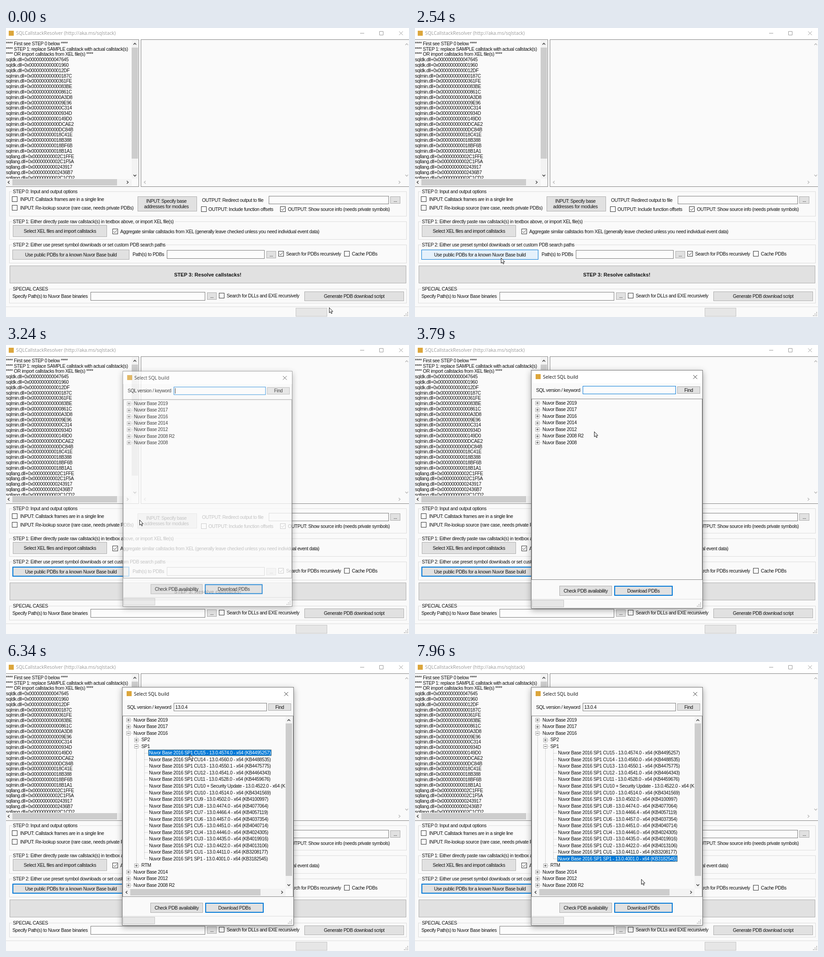
Animation, 882 px wide and 635 px high, one loop 8 s. Source, as an HTML page:

```html
<!DOCTYPE html>
<html lang="en">
<head>
<meta charset="utf-8">
<title>Callstack resolver</title>
<style>
html, body { margin: 0; width: 100%; height: 100%; overflow: hidden; background: #fafafa; }
svg { display: block; width: 100%; height: 100%; }
text { font: 10.4px "Liberation Sans", Arial, sans-serif; letter-spacing: -.36px; fill: #111; white-space: pre; }
text.title { font: 10.35px "Open Sans", sans-serif; letter-spacing: 0; }
text.bold { font-size: 11.1px; font-weight: bold; letter-spacing: 0; }
.mid { text-anchor: middle; }
.group { fill: none; stroke: #dcdcdc; }
.pane { fill: #fafafa; stroke: #828282; }
.field { fill: #fcfcfc; stroke: #7a7a7a; }
.button { fill: #e1e1e1; stroke: #adadad; }
.progress { fill: #e6e6e6; stroke: #c4c4c4; }
.check { fill: #fff; stroke: #333; }
.thumb { fill: #cdcdcd; }
.track { fill: #f3f3f3; }
.line { fill: none; stroke: #333; }
.dots { fill: none; stroke: #b0b0b0; stroke-dasharray: 1 1; }
.expander { fill: #fff; stroke: #a8a8a8; }
.hover { fill: #e5f1fb; stroke: #0078d7; }
.pressed { fill: #cce4f7; stroke: #005499; }
/* A two pixel border that lies inside the button edge. */
.default { fill: #e1e1e1; stroke: #0078d7; stroke-width: 3; clip-path: inset(-.5px) fill-box; }
.focus { stroke: #0078d7; }
.leaf rect { fill: none; }
.leaf.on rect { fill: #0078d7; stroke: #d98a30; stroke-dasharray: 1 1; }
.leaf.on text { fill: #fff; }
#titlebar text { fill: #999; }
#titlebar path { stroke: #999; }
#titlebar.active text { fill: #000; }
#titlebar.active path { stroke: #000; }
#window { filter: drop-shadow(0 4px 7px rgba(0, 0, 0, .33)); fill: #fafafa; stroke: #707070; }
</style>
</head>
<body>
<svg id="stage" viewBox="0 0 882 635" preserveAspectRatio="none"></svg>
<script>
const LOOP = 8000;
const PRODUCT = 'Nuvor Base';

// Drawing helpers; text takes the vertical middle of its line.
const box = (x1, y1, x2, y2, cls, id = '') =>
  `<rect id="${id}" class="${cls}" x="${x1 + .5}" y="${y1 + .5}" width="${x2 - x1 - 1}" height="${y2 - y1 - 1}"/>`;
const fill = (x1, y1, x2, y2, cls) =>
  `<rect class="${cls}" x="${x1}" y="${y1}" width="${x2 - x1}" height="${y2 - y1}"/>`;
const text = (x, y, s, cls = '', id = '') => `<text id="${id}" class="${cls}" x="${x}" y="${y + 3.7}">${s}</text>`;
const line = (d, cls = 'line') => `<path class="${cls}" d="${d}"/>`;
const button = (x1, y1, x2, y2, s, cls = 'button', id = '') =>
  box(x1, y1, x2, y2, cls, id) + text((x1 + x2) / 2, (y1 + y2) / 2, s, 'mid');
const group = (y1, y2, label, width) =>
  box(7, y1, 877, y2, 'group') + `<rect x="13" y="${y1 - 2}" width="${width}" height="5" fill="#fafafa"/>` + text(15, y1, label);
const check = (x, y, label, labelX, on) =>
  box(x, y, x + 12, y + 12, 'check') + (on ? line(`M${x + 2.5} ${y + 6}l2.5 2.7l4.8 -5.5`) : '') + text(labelX, y + 6, label);
const chevron = (x, y, turn, color = '#444') =>
  `<path d="M-3 1.6L0 -1.6L3 1.6" fill="none" stroke="${color}" stroke-width="1.5" transform="translate(${x} ${y}) rotate(${turn})"/>`;
const grip = (x, y) => [[0, 0], [-3.5, 0], [-7, 0], [0, -3.5], [-3.5, -3.5], [0, -7]]
  .map(([dx, dy]) => `<rect x="${x + dx}" y="${y + dy}" width="2" height="2" fill="#b5b5b5"/>`).join('');

const frames = [
  ['sqldk', '47645 1960 12DF'],
  ['sqlmin', '187C 361FE 83BE 861C A3D8 9E96 C314 934D 149D0 DCAE2 DC84B 18C41E 18B388 18BF6B 18B1A1'],
  ['sqllang', '2C1FFE 2C1F5A 243917 2436B7 2C1CD2'],
].flatMap(([dll, offsets]) => offsets.split(' ').map(o => `${dll}.dll+0x${o.padStart(16, '0')}`));

const callstack = [
  '**** First see STEP 0 below ****',
  '**** STEP 1: replace SAMPLE callstack with actual callstack(s)',
  '**** OR import callstacks from XEL file(s) ****',
  ...frames,
];

const mainWindow = () => `
  <rect width="882" height="635" fill="#fafafa"/>
  <rect width="882" height="25" fill="#fff"/>
  <g id="titlebar">
    <rect x="6" y="6" width="11" height="11" fill="#dca63c"/>
    ${text(22, 11.5, 'SQLCallstackResolver (http://aka.ms/sqlstack)', 'title')}
    ${line('M775 11.5h9M817.5 7.5h8v8h-8zM860.5 7.5l8 8m0 -8l-8 8')}
  </g>
  ${box(-2, 25, 291, 349, 'pane')}${box(295, 25, 885, 349, 'pane')}
  ${fill(275, 27, 289, 331, 'track')}${fill(0, 332, 275, 347, 'track')}
  ${fill(275, 43, 289, 287, 'thumb')}${fill(14, 332, 243, 346, 'thumb')}
  ${chevron(282, 35, 0)}${chevron(282, 324, 180)}${chevron(6, 339, -90)}${chevron(266, 339, 90)}
  ${chevron(877, 36, 0, '#bbb')}${chevron(877, 324, 180, '#bbb')}${chevron(304, 339, -90, '#bbb')}${chevron(861, 339, 90, '#bbb')}
  <clipPath id="paneClip"><rect y="26" width="275" height="305"/></clipPath>
  <g clip-path="url(#paneClip)">${callstack.map((s, i) => text(0, 34 + i * 11.8, s)).join('')}</g>

  ${group(359, 414, 'STEP 0: Input and output options', 148)}
  ${check(13, 370, 'INPUT: Callstack frames are in a single line', 31)}
  ${check(13, 389, 'INPUT: Re-lookup source (rare case, needs private PDBs)', 31)}
  ${box(288, 370, 418, 403, 'button')}
  ${text(351, 380.5, 'INPUT: Specify base', 'mid')}${text(351, 392.5, 'addresses for modules', 'mid')}
  ${text(429, 378, 'OUTPUT: Redirect output to file')}
  ${box(575, 369, 838, 387, 'field')}${button(841, 370, 863, 386, '...')}
  ${check(427, 392, 'OUTPUT: Include function offsets', 443)}
  ${check(600, 392, 'OUTPUT: Show source info (needs private symbols)', 617, true)}

  ${group(425, 465, 'STEP 1: Either directly paste raw callstack(s) in textbox above, or import XEL file(s)', 357)}
  ${button(15, 433, 221, 459, 'Select XEL files and import callstacks')}
  ${check(233, 441, 'Aggregate similar callstacks from XEL (generally leave checked unless you need individual event data)', 250, true)}

  ${group(476, 517, 'STEP 2: Either use preset symbol downloads or set custom PDB search paths', 337)}
  ${button(14, 487, 270, 509, `Use public PDBs for a known ${PRODUCT} build`, 'button', 'preset')}
  ${text(277, 497.5, 'Path(s) to PDBs')}
  ${box(352, 488, 566, 507, 'field')}${button(570, 490, 591, 506, '...')}
  ${check(596, 490, 'Search for PDBs recursively', 613, true)}
  ${check(740, 490, 'Cache PDBs', 757)}

  ${box(8, 522, 876, 561, 'button')}${text(441.5, 542, 'STEP 3: Resolve callstacks!', 'bold mid')}

  ${group(573, 605, 'SPECIAL CASES', 78)}
  ${text(14, 589, `Specify Path(s) to ${PRODUCT} binaries`)}
  ${box(185, 580, 436, 599, 'field')}${button(440, 581, 461, 597, '...')}
  ${check(466, 582, 'Search for DLLs and EXE recursively', 483)}
  ${button(653, 579, 871, 600, 'Generate PDB download script')}
  ${line('M0 612.5H882', 'group')}${box(634, 615, 703, 634, 'progress')}${grip(878, 631)}`;

const rowY = i => 127 + i * 14.53;

// A tree node: depth 0 is a version, depth 1 a service pack.
const node = (row, depth, label, open) => {
  const x = 268 + depth * 17.3, y = Math.round(rowY(row)) + .5;
  return line(`M${x + 4} ${y}h6`, 'dots') + box(x - 4.5, y - 4.5, x + 4.5, y + 4.5, 'expander') +
    line(`M${x - 2.5} ${y}h5` + (open ? '' : `M${x} ${y - 2.5}v5`)) + text(x + 11, rowY(row), label);
};

const leaf = ([name, build, kb], i) => {
  const y = rowY(i + 5);
  return `<g class="leaf">${line(`M303 ${Math.round(y) + .5}h8`, 'dots')}
    <rect x="311.5" y="${y - 7}" width="268" height="13.5"/>
    ${text(313, y, `${PRODUCT} 2016 SP1 ${name} - 13.0.${build} - x64 (KB${kb})`)}</g>`;
};

const updates = `CU15 4574.0 4495257|CU14 4560.0 4488535|CU13 4550.1 4475775|CU12 4541.0 4464343
|CU11 4528.0 4459676|CU10_+_Security_Update 4522.0 4505830|CU10 4514.0 4341569|CU9 4502.0 4100997
|CU8 4474.0 4077064|CU7 4466.4 4057119|CU6 4457.0 4037354|CU5 4451.0 4040714|CU4 4446.0 4024305
|CU3 4435.0 4019916|CU2 4422.0 4013106|CU1 4411.0 3208177|SP1 4001.0 3182545`
  .split('|').map(s => s.trim().split(' ').map(part => part.replace(/_/g, ' ')));

const versions = ['2019', '2017', '2016', '2014', '2012', '2008 R2', '2008'].map(v => `${PRODUCT} ${v}`);

const closedTree = () => line('M268.5 127V214', 'dots') + versions.map((v, i) => node(i, 0, v)).join('');

const openTree = () => `
  <clipPath id="treeClip"><rect x="256" y="119" width="355" height="379"/></clipPath>
  <g clip-path="url(#treeClip)">
    ${line('M268.5 127V498M285.5 162V447M303 191V432', 'dots')}
    ${versions.slice(0, 6).map((v, i) => node(i < 3 ? i : i + 20, 0, v, i === 2)).join('')}
    ${node(3, 1, 'SP2')}${node(4, 1, 'SP1', true)}${node(22, 1, 'RTM')}
    ${updates.map(leaf).join('')}
  </g>
  ${fill(612, 120, 627, 498, 'track')}${fill(257, 498, 612, 514, 'track')}
  ${fill(612, 135, 626, 470, 'thumb')}${fill(272, 499, 557, 513, 'thumb')}
  ${chevron(619, 128, 0)}${chevron(619, 490, 180)}${chevron(264, 506, -90)}${chevron(604, 506, 90)}`;

const dialog = () => `<g id="dialog">
  ${box(254, 55, 630, 579, '', 'window')}
  <rect x="255" y="56" width="374" height="28" fill="#fff"/>
  <rect x="264" y="64" width="11" height="11" fill="#dca63c"/>
  ${text(280, 70, 'Select SQL build', 'title')}${line('M609 66l8.5 8.5m0 -8.5l-8.5 8.5')}
  ${text(265, 99, 'SQL version / keyword')}
  ${box(367, 90, 571, 108, 'field', 'keyword')}${text(370.5, 99, '', '', 'typed')}
  <path id="caret" d="M.5 93V105" stroke="#000"/>
  ${button(574, 91, 624, 107, 'Find', 'button', 'find')}
  ${box(255, 118, 629, 516, 'pane')}
  <g id="closed">${closedTree()}</g><g id="open">${openTree()}</g>
  ${button(316, 529, 431, 551, 'Check PDB availability')}
  ${button(436, 529, 564, 551, 'Download PDBs', 'default', 'download')}
  ${line('M255 558.5H629', 'group')}${box(256, 560, 326, 576, 'progress')}${grip(624, 573)}
</g>`;

const pointer = `<path id="pointer" d="M.5 .5V11.8L3 9.5L5 13.6L6.8 12.8L4.9 8.9H8.4Z" fill="#fff" stroke="#000" stroke-width=".9"/>`;

const stage = document.getElementById('stage');
stage.innerHTML = mainWindow() + dialog() + pointer;
const $ = id => document.getElementById(id);
const leaves = [...stage.querySelectorAll('.leaf')];
for (const g of leaves) {
  g.querySelector('rect').setAttribute('width', g.querySelector('text').getComputedTextLength() + 3);
}

// Pointer moves: first change, last change, steps, then [step, x, y] keys.
const moves = [
  [70, 390, 5, [2, 414, 468], [3, 186, 352], [5, 160, 338]],
  [600, 1370, 11, [4, 175, 345], [7, 219, 408], [10, 201, 460], [11, 200, 463]],
  [1550, 1780, 4, [4, 190, 495]],
  [2050, 2320, 5, [5, 188, 510]],
  [2460, 2860, 6, [2, 188, 505]],
  [3000, 3790, 11, [1, 190, 502], [4, 292, 384], [7, 347, 225], [11, 392, 190]],
  [3860, 4030, 3, [3, 398, 184]],
  [6340, 7110, 11, [1, 402, 203], [11, 495, 389]],
  [7190, 7440, 4, [4, 467, 432]],
  [7650, 7650, 1, [1, 456, 423]],
  [7810, 7960, 3, [3, 495, 477]],
];

function pointerAt(t) {
  let x = 707, y = 614;
  for (const [start, end, steps, ...keys] of moves) {
    if (t < start) break;
    const gap = (end - start) / (steps - 1) || 1;
    const step = Math.min(steps, Math.floor((t - start) / gap + 1.05));
    let from = 0;
    for (const [key, kx, ky] of keys) {
      const p = Math.min(1, (step - from) / (key - from));
      x += (kx - x) * p;
      y += (ky - y) * p;
      if (step <= key) break;
      from = key;
    }
  }
  return [x, y];
}

// Stepped values: [time, value], each held until the next.
const at = (table, t) => table.reduce((value, [time, next]) => t >= time ? next : value, table[0][1]);
const presetLook = [[0, 'button'], [1700, 'hover'], [2250, 'button'], [2460, 'hover'], [2620, 'pressed'], [2780, 'default']];
const opening = [[0, [0, .9]], [3080, [.15, .945]], [3160, [.45, .97]], [3240, [.77, .988]], [3330, [1, 1]]];
const typing = [[0, ''], [4030, '1'], [4250, '13'], [4420, '13.'], [4630, '13.0'], [4950, '13.0.'], [5260, '13.0.4']];

const show = (id, on) => $(id).setAttribute('visibility', on ? 'visible' : 'hidden');
const between = (t, a, b) => t >= a && t < b;

function render(t) {
  const [x, y] = pointerAt(t);
  $('pointer').setAttribute('transform', `translate(${x} ${y})`);
  $('titlebar').classList.toggle('active', between(t, 2700, 3080));
  $('preset').setAttribute('class', at(presetLook, t));

  const [opacity, scale] = at(opening, t);
  $('dialog').setAttribute('opacity', opacity);
  $('dialog').setAttribute('transform', `translate(363 240) scale(${scale}) translate(-363 -240)`);

  $('typed').textContent = at(typing, t);
  $('caret').setAttribute('transform', `translate(${370 + $('typed').getComputedTextLength()} 0)`);
  show('caret', between(t, 3160, 3700) || between(t, 4030, 5490));
  $('keyword').classList.toggle('focus', t < 5490);

  const searching = between(t, 5490, 5820);
  $('find').setAttribute('class', searching ? 'default' : 'button');
  $('download').setAttribute('class', searching ? 'button' : 'default');
  show('closed', t < 5740);
  show('open', t >= 5740);
  leaves[0].classList.toggle('on', t < 7650);
  leaves[16].classList.toggle('on', t >= 7650);
}

const begin = performance.now();
function tick() {
  render((performance.now() - begin) % LOOP);
  requestAnimationFrame(tick);
}
tick();
</script>
</body>
</html>
```
